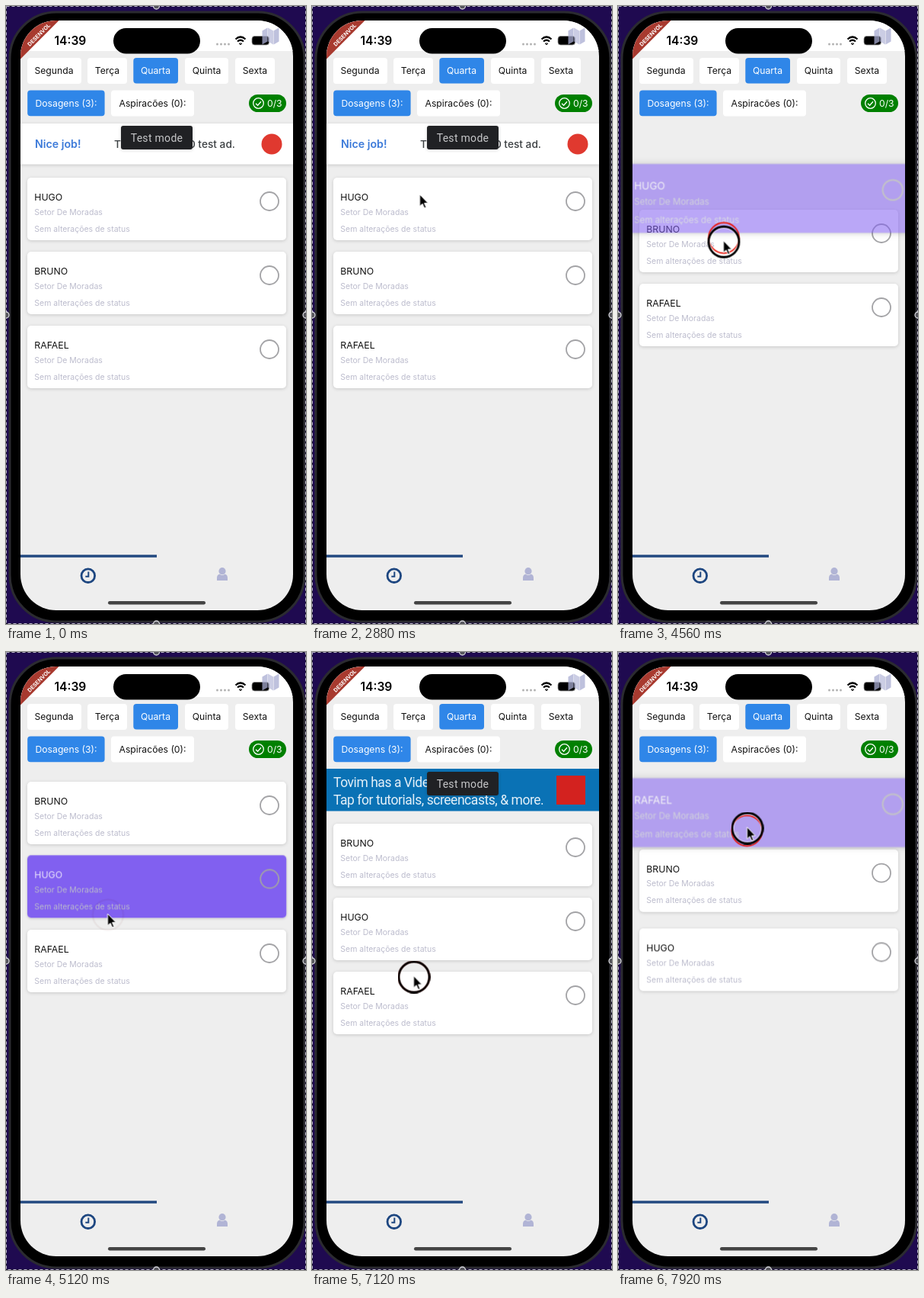
Write an HTML page that moves like this. It is 394x810 px and loops after 8000 ms.

```html
<!DOCTYPE html>
<html lang="pt">
<head>
<meta charset="utf-8">
<title>Lista reordenável</title>
<style>
html, body { margin: 0; width: 100%; height: 100%; overflow: hidden; background: #1f0a50; }
svg { display: block; width: 394px; height: 810px; font: 12.2px Inter, sans-serif; }
.mid { text-anchor: middle; }
.blue { fill: #2f86e8; }
.white { fill: #fff; }
.soft { filter: drop-shadow(0 1px 2px rgba(0, 0, 0, .16)); }

/* One loop is 8 s, so 1% is 80 ms. */
.anim, .card { animation: 8s linear infinite; }
.card { color: #fff; fill: #111; transform-origin: 198px 211px; }
.card rect { fill: currentColor; }
.card text { font-size: 12.3px; }
.rows text { font-size: 10.5px; fill: #bcbccd; }

#list { animation-name: list; animation-timing-function: step-end; }
#ad1 { animation-name: ad1; animation-timing-function: step-end; }
#ad2 { animation-name: ad2; animation-timing-function: step-end; }
#first { animation-name: first; }
#second { animation-name: second; }
#third { animation-name: third; }
.pointer { animation-name: pointer; }
.press { animation-name: press; }
.late { animation-delay: -7.96s; }

@keyframes list {
  0%, 68% { transform: translateY(55px); }
  47%, 91%, 100% { transform: none; }
}
@keyframes ad1 { 0% { opacity: 1; } 47%, 100% { opacity: 0; } }
@keyframes ad2 { 0%, 91%, 100% { opacity: 0; } 74% { opacity: 1; } }

@keyframes first {
  0%, 47% { transform: translateY(0) scale(1); opacity: 1; color: #fff; fill: #111; filter: drop-shadow(0 0 0 rgba(0, 0, 0, 0)); }
  50%, 53% { transform: translateY(0) scale(1.1); opacity: .55; color: #8160f0; fill: #fff; filter: drop-shadow(0 0 5px rgba(0, 0, 0, .25)); }
  57% { transform: translateY(41px) scale(1.1); }
  61% { transform: translateY(77px) scale(1.1); opacity: .55; filter: drop-shadow(0 0 5px rgba(0, 0, 0, .25)); animation-timing-function: ease-out; }
  64.2% { transform: translateY(96.5px) scale(1); opacity: 1; color: #8160f0; fill: #ece6fd; filter: drop-shadow(0 0 0 rgba(0, 0, 0, 0)); }
  67.5% { transform: translateY(97px) scale(1); color: #fff; fill: #111; }
  95.8% { transform: translateY(97px) scale(1); animation-timing-function: ease; }
  99.4%, 100% { transform: translateY(193px) scale(1); opacity: 1; color: #fff; fill: #111; filter: drop-shadow(0 0 0 rgba(0, 0, 0, 0)); }
}
@keyframes second {
  0%, 58% { transform: translateY(97px); animation-timing-function: ease; }
  61.2% { transform: none; }
  97.2% { transform: none; animation-timing-function: ease; }
  100% { transform: translateY(97px); }
}
@keyframes third {
  0%, 91% { transform: translateY(194px) scale(1); opacity: 1; color: #fff; fill: #111; filter: drop-shadow(0 0 0 rgba(0, 0, 0, 0)); }
  93% { transform: translateY(194px) scale(1.1); }
  94% { transform: translateY(190px) scale(1.1); opacity: .55; color: #8160f0; fill: #fff; filter: drop-shadow(0 0 5px rgba(0, 0, 0, .25)); }
  95% { transform: translateY(164px) scale(1.1); }
  96% { transform: translateY(95px) scale(1.1); }
  97% { transform: translateY(30px) scale(1.1); }
  98% { transform: translateY(6px) scale(1.1); }
  99%, 100% { transform: translateY(-.5px) scale(1.1); opacity: .55; color: #8160f0; fill: #fff; filter: drop-shadow(0 0 5px rgba(0, 0, 0, .25)); }
}
@keyframes pointer {
  0%, 22% { transform: translate(-24px, 460px); }
  25%, 26% { transform: translate(60px, 452px); animation-timing-function: ease-in-out; }
  36%, 38% { transform: translate(141.5px, 247px); }
  39%, 53% { transform: translate(138.5px, 266px); }
  57% { transform: translate(138.5px, 307.5px); }
  61%, 64% { transform: translate(133.5px, 343px); }
  69%, 77% { transform: translate(133.5px, 377px); }
  81%, 93% { transform: translate(133.5px, 424.5px); }
  94% { transform: translate(133.5px, 420px); }
  95% { transform: translate(139.5px, 394px); }
  96% { transform: translate(150px, 325px); }
  97% { transform: translate(163px, 260px); }
  98% { transform: translate(168px, 236px); }
  99%, 100% { transform: translate(169.5px, 229.5px); }
}
@keyframes press {
  0%, 38.9% { opacity: 0; }
  39%, 61% { opacity: 1; }
  63% { opacity: .08; }
  64.5%, 83.9% { opacity: 0; }
  84%, 100% { opacity: 1; }
}
</style>
</head>
<body>
<svg viewBox="0 0 394 810">
  <defs>
    <clipPath id="screen"><rect x="19" y="19" width="358" height="773" rx="47"/></clipPath>
    <g id="rows" class="rows">
      <text x="37.3" y="218.6">Setor De Moradas</text>
      <text x="37.3" y="240.7">Sem alterações de status</text>
      <circle cx="346" cy="201" r="12" fill="none" stroke="#a3a3a6" stroke-width="1.8"/>
    </g>
    <g id="mode">
      <rect class="soft" x="151" y="157" width="94" height="31" rx="3" fill="#202124"/>
      <text class="mid" x="198" y="177.5" fill="#c6c7c9" style="font:14px Roboto,sans-serif;letter-spacing:.3px">Test mode</text>
    </g>
  </defs>

  <!-- device -->
  <rect width="394" height="810" fill="#1f0a50"/>
  <rect x="5" y="8" width="387" height="799" rx="61" fill="#000" stroke="#2b2b30" stroke-width="3"/>

  <g clip-path="url(#screen)">
    <rect x="19" y="19" width="358" height="773" fill="#eee"/>
    <rect class="white" x="19" y="19" width="358" height="40"/>

    <!-- status bar -->
    <path d="M19 46 46 19H69.5L19 69.5Z" fill="#a83a2f"/>
    <text class="mid white" transform="translate(45 39.5) rotate(-45)" style="font-size:7.2px;font-weight:700">DESENVOL</text>
    <text x="63.5" y="51" fill="#000" style="font-size:15.6px;font-weight:600">14:39</text>
    <rect x="141" y="29" width="114" height="33.5" rx="16.7"/>
    <path d="M277.5 50H293" stroke="#b3b3b3" stroke-width="3" stroke-linecap="round" stroke-dasharray="0 5"/>
    <g fill="none" stroke="#000" stroke-width="2.2">
      <path d="M301.5 43.5Q308 37.5 314.5 43.5M304 46.5Q308 43 312 46.5"/>
      <path d="M306.3 49 308 51 309.7 49Z" stroke-width="1"/>
    </g>
    <rect x="323" y="39.5" width="22.5" height="11.5" rx="3.5" stroke="#999" stroke-width=".8"/>
    <g fill="#a9acd2" opacity=".75">
      <path d="M336.5 32.5 343.5 28.5V46.5L336.5 50.5ZM351.5 32.5 358.5 28.5V46.5L351.5 50.5Z"/>
      <path d="M344 28.5 351 32.5V50.5L344 46.5Z" opacity=".8"/>
    </g>

    <!-- filters -->
    <g class="white">
      <rect x="28" y="68" width="71" height="34" rx="4"/>
      <rect x="107" y="68" width="52" height="34" rx="4"/>
      <rect class="blue" x="167.3" y="68" width="58.7" height="33.6" rx="4"/>
      <rect x="235" y="68" width="57" height="34" rx="4"/>
      <rect x="301" y="68" width="52" height="34" rx="4"/>
      <rect class="blue" x="28.2" y="110.6" width="101.4" height="33.6" rx="4"/>
      <rect x="138" y="110.5" width="109" height="34" rx="4"/>
    </g>
    <g class="mid" fill="#111">
      <text x="63" y="89.4">Segunda</text>
      <text x="133" y="89.4">Terça</text>
      <text class="white" x="196.5" y="89.4">Quarta</text>
      <text x="263.5" y="89.4">Quinta</text>
      <text x="327" y="89.4">Sexta</text>
      <text class="white" x="79" y="132">Dosagens (3):</text>
      <text x="192.5" y="132">Aspiracões (0):</text>
    </g>
    <rect x="319" y="116" width="49" height="23" rx="11.5" fill="#008000"/>
    <g fill="none" stroke="#fff" stroke-width="1.3">
      <circle cx="331.5" cy="127.5" r="6.8"/>
      <path d="M328 127.7 330.6 130.2 335 125.2"/>
    </g>
    <text class="white" x="343" y="132">0/3</text>

    <!-- banners -->
    <g id="ad1" class="anim">
      <rect class="white soft" x="19" y="154" width="358" height="53.5"/>
      <text x="38" y="186.3" fill="#3c7ad9" style="font-size:14.2px;font-weight:600">Nice job!</text>
      <g fill="#3c4043" style="font-size:13.7px;font-weight:500">
        <text x="142" y="186.3">This is a</text>
        <text x="301" y="186.3" text-anchor="end">320x50 test ad.</text>
      </g>
      <circle cx="349" cy="181" r="13.5" fill="#e0392f"/>
      <use href="#mode"/>
    </g>
    <g id="ad2" class="anim">
      <rect x="19" y="153" width="358" height="55.5" fill="#0a72b5"/>
      <g fill="#e4f0f8" style="font:17.5px Roboto,sans-serif;letter-spacing:-.45px">
        <text x="28" y="177">Tovim has a Video page</text>
        <text x="28" y="200">Tap for tutorials, screencasts, &amp; more.</text>
      </g>
      <rect x="321" y="162" width="38" height="38" fill="#d3221f"/>
      <use href="#mode"/>
    </g>

    <!-- cards -->
    <g id="list" class="anim">
      <g id="second" class="card">
        <rect class="soft" x="28" y="170" width="340" height="82" rx="5"/>
        <text x="37.3" y="200.4">BRUNO</text>
        <use href="#rows"/>
      </g>
      <g id="first" class="card">
        <rect class="soft" x="28" y="170" width="340" height="82" rx="5"/>
        <text x="37.3" y="200.4">HUGO</text>
        <use href="#rows"/>
      </g>
      <g id="third" class="card">
        <rect class="soft" x="28" y="170" width="340" height="82" rx="5"/>
        <text x="37.3" y="200.4">RAFAEL</text>
        <use href="#rows"/>
      </g>
    </g>

    <!-- bottom bar -->
    <rect x="19" y="719.3" width="179" height="3.4" fill="#20477f"/>
    <g fill="none" stroke="#1d4680">
      <circle cx="107.8" cy="746.7" r="8.8" stroke-width="2.8"/>
      <path d="M108.3 741.5V747.8H104.3" stroke-width="2"/>
    </g>
    <g fill="#b1b4d5">
      <circle cx="284" cy="740.7" r="4.6"/>
      <path d="M277 753V749.5Q277 745.5 280.5 744.5Q284 747.5 287.5 744.5Q291 745.5 291 749.5V753Z"/>
    </g>
    <rect x="134" y="780" width="128" height="4.5" rx="2.2" fill="#444"/>
  </g>

  <!-- selection border -->
  <g fill="none">
    <rect x=".5" y=".5" width="393" height="809" stroke="#17122b"/>
    <rect x=".5" y=".5" width="393" height="809" stroke="#b9b5c6" stroke-dasharray="4 3"/>
  </g>
  <g fill="#55555c" stroke="#d8d8de" stroke-width="1.3">
    <circle cx="197.5" cy="0" r="4"/>
    <circle cx="197.5" cy="810" r="4"/>
    <circle cx="0" cy="405" r="4"/>
    <circle cx="394" cy="405" r="4"/>
  </g>

  <!-- pointer -->
  <g class="anim pointer late">
    <circle class="anim press" cx=".5" cy="1.5" r="20" fill="none" stroke="#e8190f" stroke-width="1.8"/>
  </g>
  <g class="anim pointer">
    <g class="anim press" fill="none">
      <circle cx=".5" cy="1.5" r="18" stroke="#fff" stroke-opacity=".7"/>
      <circle cx=".5" cy="1.5" r="20" stroke="#000" stroke-width="2.8"/>
    </g>
    <path d="M0 0V15.5L3.6 12.2 6 17.8 8.4 16.8 6 11.3H10.8Z" stroke="#fff"/>
  </g>
</svg>
</body>
</html>
```
